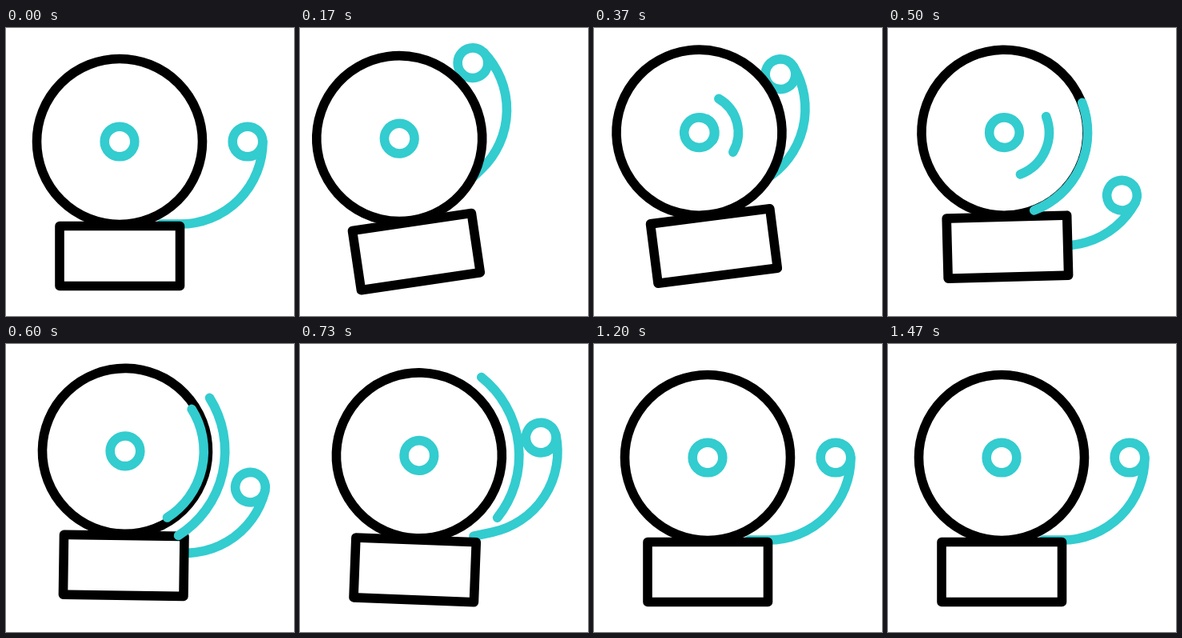
An HTML page for the animation above (1670 ms loop, 360 by 360 pixels).

```html
<!DOCTYPE html>
<html lang="en">
<head>
<meta charset="utf-8">
<title>Ringing bell</title>
<style>
  html, body { margin: 0; width: 100%; height: 100%; overflow: hidden; background: #fff; }
  svg { display: block; width: 100vw; height: 100vh; }
  .ink, .teal { stroke-width: 11.6; stroke-linecap: round; stroke-linejoin: round; }
  .ink { stroke: #000; fill: #fff; }
  .teal { stroke: #33cccf; fill: none; }
</style>
</head>
<body>
<svg viewBox="0 0 360 360">
  <!-- striker, drawn around the centre of its arc -->
  <g id="arm" class="teal">
    <path d="M103 0A103 103 0 0 1 0 103H-24"/>
    <circle cx="84" r="18.8" fill="#fff"/>
  </g>
  <!-- body, drawn around the bell centre -->
  <g id="body">
    <rect class="ink" x="-75" y="105.5" width="150.5" height="75"/>
    <circle class="ink" r="103.5"/>
    <circle class="teal" r="18.8"/>
  </g>
  <g id="waves" class="teal">
    <path/>
    <path/>
  </g>
</svg>
<script>
const LOOP = 1670, STEP = 100 / 3, LAST = 44;
const HOP_STEPS = 26, SETTLE_STEPS = 6;
const WAVE_START = 231, WAVE_GAP = 116, WAVE_GROW = 380, WAVE_LIFE = 400;

// Key poses, as offsets from rest
const poses = [
  { n: 0, tilt: 0, x: 0, y: 0, swing: 0, wave: -20 },
  { n: 5, tilt: -8.4, x: -62.5, y: -40, swing: -44, wave: -25 },
  { n: 11, tilt: -7.3, x: -57, y: -41, swing: -31, wave: -15 },
  { n: 15, tilt: -1.5, x: 0.7, y: 27, swing: 28.6, wave: 24 },
  { n: 22, tilt: 2.2, x: 1, y: -7.5, swing: -12, wave: -6.5 }
];
const end = poses.length - 1;

const $ = id => document.getElementById(id);
const arm = $("arm"), body = $("body"), waves = $("waves");

function slope(i, key) {
  if (i === 0 || i === end) return 0;
  const a = poses[i - 1], b = poses[i + 1];
  return (b[key] - a[key]) / (b.n - a.n);
}

// Smooth curve through the poses, then a short damped swing back to rest
function at(n, key) {
  const m = n - poses[end].n;
  if (m >= SETTLE_STEPS) return 0;
  if (m >= 0) return poses[end][key] * Math.cos(Math.PI * m / 3) * Math.sqrt(1 - m / SETTLE_STEPS);
  const i = poses.findIndex(p => p.n > n) - 1;
  const p = poses[i], q = poses[i + 1], h = q.n - p.n;
  const u = (n - p.n) / h, v = 1 - u;
  return p[key] + (q[key] - p[key]) * u * u * (3 - 2 * u)
    + h * u * v * (v * slope(i, key) - u * slope(i + 1, key));
}

const place = (el, x, y, a) => el.setAttribute("transform", `translate(${x} ${y}) rotate(${a})`);

function drawWave(path, age) {
  const on = age >= 0 && age < WAVE_LIFE;
  path.style.display = on ? "" : "none";
  if (!on) return;
  const u = Math.min(1, age / WAVE_GROW);
  const r = 18.8 + 106.2 * (1 - Math.cos(Math.PI * u)) / 2;
  const k = r * Math.SQRT1_2;
  path.setAttribute("d", `M${k} ${-k}A${r} ${r} 0 0 1 ${k} ${k}`);
}

function draw(now) {
  const n = Math.min(LAST, Math.floor((now % LOOP + 4) / STEP));
  const hop = n < HOP_STEPS ? 12 * Math.sin(Math.PI * n / HOP_STEPS) ** 2 : 0;
  const tilt = at(n, "tilt");
  const x = 142 + 2.4 * tilt + 0.62 * hop, y = 142 - hop;
  place(body, x, y, tilt);
  place(arm, 218 + at(n, "x"), 142 + at(n, "y"), at(n, "swing"));
  place(waves, x, y, at(n, "wave"));
  [...waves.children].forEach((path, i) =>
    drawWave(path, n * STEP - WAVE_START - i * WAVE_GAP));
}

const start = performance.now();
function tick() {
  draw(performance.now() - start);
  requestAnimationFrame(tick);
}
tick();
</script>
</body>
</html>
```
